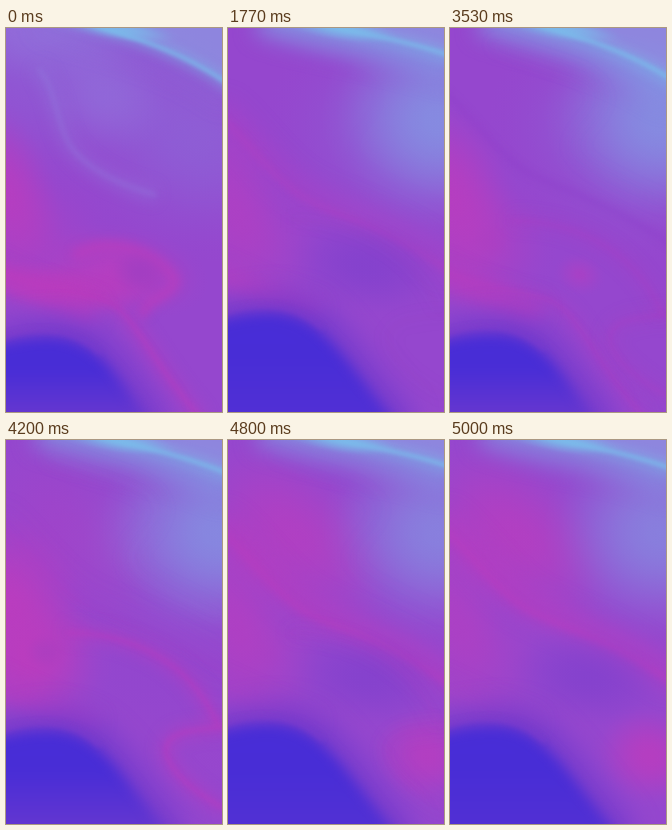
An HTML page with a canvas for the animation above (5.03 s loop, 270x480 px).

```html
<!DOCTYPE html>
<html lang="en">
<head>
<meta charset="utf-8">
<title>Flowing gradient</title>
<style>
html, body { margin: 0; width: 100%; height: 100%; overflow: hidden; background: #9648ce; }
canvas { display: block; width: 100vw; height: 100vh; }
</style>
</head>
<body>
<canvas id="stage" width="270" height="480"></canvas>
<script>
const W = 270, H = 480, LOOP = 5030, SWAY = 3150;
const ctx = document.getElementById('stage').getContext('2d');

const BASE = '149,71,206', LAVENDER = '142,92,213', PALE = '147,126,223', SKY = '132,148,227',
  CYAN = '122,190,235', MAGENTA = '187,60,190', VIOLET = '128,64,205', BLUE = '69,44,214';

const paths = {
  crease: 'M40 50C66 80 62 130 88 157Q120 190 188 209',
  swirl: 'M50 18C120 50 200 55 187 95C180 118 150 130 158 156Q170 178 275 222',
  ridge: 'M-15 105C20 130 50 180 92 208C130 232 200 245 285 308',
  tail: 'M-20 298C30 322 90 330 125 340C160 355 175 410 245 490',
  bulge: 'M85 285C125 260 175 275 208 310C222 332 170 335 171 362',
  arc: 'M75 241C140 240 195 265 230 302Q253 328 266 358',
  loop: 'M280 358C230 362 200 365 200 388C203 415 235 440 275 462',
  band: 'M-25 302C20 325 60 340 112 358'
};
for (const name in paths) paths[name] = new Path2D(paths[name]);

function ramp(t, from, to) {
  const k = Math.min(1, Math.max(0, (t - from) / (to - from)));
  return k * k * (3 - 2 * k);
}

// 1 when the sway is at the given phase, falling to 0 on both sides.
function near(phase, center) {
  const d = Math.abs(((phase - center + 1.5) % 1) - .5);
  return d < .3 ? Math.cos(d / .3 * Math.PI / 2) ** 2 : 0;
}

// The folds sway back and forth while the colours drift from hazy to cool to warm.
function poseAt(t) {
  const phase = t / SWAY % 1;
  return {
    swing: Math.cos(phase * 2 * Math.PI),
    high: near(phase, .97),
    mid: near(phase, .3),
    low: near(phase, .56),
    early: 1 - ramp(t, 0, 900),
    haze: 1 - ramp(t, 0, 1700),
    cool: ramp(t, 600, 1800),
    warm: ramp(t, 3700, 5000)
  };
}

function blob(x, y, rx, ry, turn, color, alpha) {
  if (alpha <= 0) return;
  const g = ctx.createRadialGradient(0, 0, 0, 0, 0, 1);
  for (let r = 0; r <= 1; r += .125)
    g.addColorStop(r, `rgba(${color},${alpha * (1 - r * r) ** 2})`);
  ctx.save();
  ctx.translate(x, y);
  ctx.rotate(turn);
  ctx.scale(rx, ry);
  ctx.fillStyle = g;
  ctx.fillRect(-1, -1, 2, 2);
  ctx.restore();
}

function soft(path, color, alpha, blur, width = 0, dx = 0, dy = 0) {
  if (alpha <= 0) return;
  ctx.save();
  ctx.translate(dx, dy);
  ctx.filter = `blur(${blur}px)`;
  ctx.globalAlpha = alpha;
  ctx.lineWidth = width;
  ctx.strokeStyle = ctx.fillStyle = typeof color === 'string' ? `rgb(${color})` : color;
  if (width) ctx.stroke(path); else ctx.fill(path);
  ctx.restore();
}

// A fine line inside a wide halo.
function thread(path, color, alpha, dy = 0) {
  soft(path, color, alpha * .45, 9, 18, 0, dy);
  soft(path, color, alpha * .6, 3, 4, 0, dy);
}

function drawSky({ swing, haze, cool, warm }) {
  const light = .1 + .75 * cool - .15 * warm;
  blob(70, 30, 260, 180, 0, LAVENDER, .9 * haze);
  blob(30, 0, 150, 75, .2, PALE, .5 * haze);
  blob(230, 145, 190, 140, .4, LAVENDER, .8 - .5 * warm);
  blob(80, 120, 160, 100, .7, MAGENTA, .75 * warm);
  blob(265, 115, 150, 135, .3, SKY, light);

  const e = 48 + 17 * swing;
  const curve = `M40 -25C110 0 200 ${e * .2} 285 ${e * 1.15}`;
  const crest = new Path2D(curve);
  soft(crest, SKY, light, 14, 38, 0, 12);
  soft(new Path2D(curve + 'V-40H40Z'), '141,144,225', .85, 4);
  soft(crest, CYAN, .45, 7, 14, 0, 2);
  soft(crest, CYAN, .75, 2.5, 5);
  blob(145, 2, 75, 16, .14, CYAN, .75);
}

function drawFolds({ swing, high, mid, low, early, cool, warm }) {
  const shift = -16 - 20 * swing;
  blob(125, 85, 90, 75, .5, PALE, .4 * early);
  thread(paths.crease, PALE, high * early * .7);

  const swirl = mid * (1 - .8 * cool);
  blob(165, 118, 75, 75, .2, PALE, swirl * .75);
  thread(paths.swirl, PALE, swirl * .75);

  soft(paths.ridge, '141,60,202', high * cool * .75, 4, 7, 0, shift);
  soft(paths.ridge, MAGENTA, low * (.3 + .3 * warm), 14, 30, 0, shift - 8);
  soft(paths.ridge, MAGENTA, low * (.35 + .25 * warm), 4, 6, 0, shift);
}

function drawWarmth({ high, mid, low, early, warm }) {
  const left = .5 + .3 * high + .45 * mid;
  blob(0, 205, 70 + 40 * mid, 125, -.3, MAGENTA, left);
  blob(30, 270, 105, 95, .3, MAGENTA, .35 + .6 * mid);
  blob(172, 298, 110, 65, .2, VIOLET, low * .75);
  blob(250, 395, 75, 65, .3, MAGENTA, low * warm * .85);

  blob(140, 305, 115, 60, .15, MAGENTA, early * .8);
  blob(75, 322, 130, 34, .1, MAGENTA, early * .8);
  soft(paths.bulge, MAGENTA, early * .65, 6, 14);
  blob(168, 306, 42, 32, .3, '163,62,194', early);
  blob(162, 308, 34, 28, .3, MAGENTA, high * (1 - early) * .8);
  blob(162, 308, 13, 10, .3, '170,62,196', high * (1 - early) * .8);
  thread(paths.tail, MAGENTA, high);

  thread(paths.arc, MAGENTA, mid);
  thread(paths.loop, MAGENTA, mid);
  blob(50, 265, 30, 26, 0, '171,62,192', mid * .8);
  soft(paths.band, MAGENTA, (.6 + .2 * high) * (1 - .7 * warm), 12, 26, 0, 0, -6);
}

function drawDeep({ swing, low }) {
  const y = 363 + 16 * swing, foot = 203 - 16 * swing, fade = 1 - .7 * low;
  const hill = new Path2D(
    `M-60 ${y + 24}C-20 ${y + 12} 15 ${y - 2} 60 ${y}C118 ${y + 4} 140 ${y + 52} ${foot} 495V560H-60Z`);
  const rim = new Path2D(`M-20 ${y + 18}C10 ${y - 6} 75 ${y - 12} 118 ${y + 28}`);
  soft(hill, '108,56,206', .7, 16, 0, 12, -16);
  const fill = ctx.createLinearGradient(0, y, 0, H);
  fill.addColorStop(.2, `rgb(${BLUE})`);
  fill.addColorStop(.4, `rgb(${BLUE})`);
  fill.addColorStop(1, `rgb(${69 + 34 * fade},${44 + 11 * fade},${214 - 8 * fade})`);
  soft(hill, fill, .95, 8, 0, 0, 8);
  soft(rim, '138,62,203', .5, 3, 4);
}

function draw(t) {
  const pose = poseAt(t);
  ctx.fillStyle = `rgb(${BASE})`;
  ctx.fillRect(0, 0, W, H);
  drawSky(pose);
  drawFolds(pose);
  drawWarmth(pose);
  drawDeep(pose);
}

const start = performance.now();
function tick() {
  draw((performance.now() - start) % LOOP);
  requestAnimationFrame(tick);
}
tick();
</script>
</body>
</html>
```
